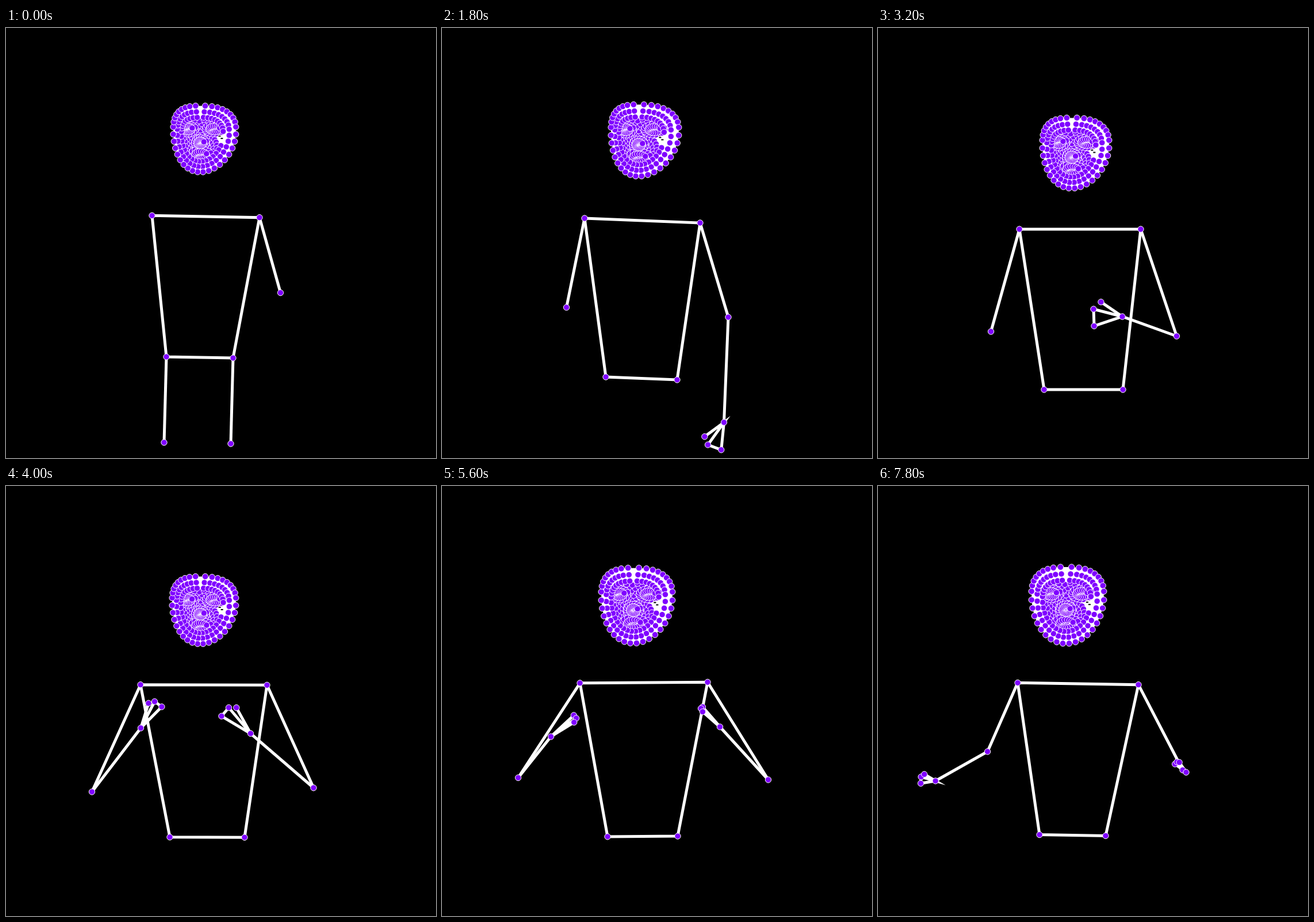
An HTML page with a canvas for the animation above (8 s loop, 748 by 748 pixels).

```html
<!DOCTYPE html>
<html lang="en">
<head>
<meta charset="utf-8">
<title>Pose tracking</title>
<style>
  html, body { margin: 0; width: 100%; height: 100%; overflow: hidden; background: #000; }
  canvas { display: block; width: 100vw; height: 100vh; }
</style>
</head>
<body>
<canvas id="stage" width="748" height="748"></canvas>
<script>
const ctx = document.getElementById('stage').getContext('2d');
const LOOP = 8000, STEP = 200, TAU = Math.PI * 2;
const PURPLE = '#7f00ff', GREEN = '#00ff00', DARK_GREEN = '#4a7a14';

// Key poses in seconds; shorter tracks line up with the last poses.
const times = [0, 1.8, 3.2, 4, 5.6, 6.8, 7.8];
const tilt = [[0.018], [0.04], [0], [0.003], [-0.007], [-0.004], [0.016]];

// Centre x, centre y, half width
const shoulders = [[347.5, 328, 93.5], [348.5, 335, 100.5], [351.5, 350, 105.5], [344, 346, 110], [351, 342, 111], [349, 339.5, 106], [348, 344, 105]];
const hips = [[337, 573, 58], [347, 609.5, 62], [357.5, 629, 68.5], [350, 611, 65], [349, 609.5, 61], [336.5, 595, 58], [338.5, 607.5, 57.5]];

// Centre x, centre y, width, turn of the midline
const face = [[345.5, 193, 109, -7.5], [353, 195.5, 118, -11], [344, 217.5, 116, -7], [344.5, 216, 111, -6.5], [339, 208, 124, -6], [345, 206, 114, -11], [330, 207.5, 126, -3]];

// Hands: offset from wrist to index finger, then spread in degrees
const arms = {
  L: {
    elbow: [[216.5, 486], [196.5, 528], [149.5, 532], [132.5, 507.5], [163, 458], [190.5, 462]],
    wrist: [[234.5, 421], [189.5, 436], [118.5, 475.5], [100, 513]],
    hand: [[24, -46, -17], [44, -32, 7], [-10, -23, 50], [-25, -7, 25]],
    elbowFrom: 1.4, wristFrom: 3.6
  },
  R: {
    elbow: [[477.5, 460.5], [498, 503], [519.5, 536], [535, 525], [567.5, 511], [533.5, 475], [530, 494]],
    wrist: [[490.5, 686], [425, 502], [425.5, 430.5], [483.5, 419], [528.5, 475], [536, 498]],
    hand: [[-28, 39, 30], [-50, -13, 33], [-38, -45, 19], [-33, -32, -5], [-2, -8, 25], [-16, -18, 12]],
    elbowFrom: 0, wristFrom: 1.4
  }
};

const linear = k => k;
const smooth = k => k * k * (3 - 2 * k);

function sample(track, t, ease = linear) {
  const keys = times.slice(-track.length);
  const i = Math.max(0, keys.findLastIndex(key => key <= t));
  if (t <= keys[0] || i === keys.length - 1) return track[i];
  const k = ease((t - keys[i]) / (keys[i + 1] - keys[i]));
  return track[i].map((v, n) => v + (track[i + 1][n] - v) * k);
}

function line(points, color = '#fff') {
  ctx.beginPath();
  points.forEach(p => ctx.lineTo(...p));
  ctx.strokeStyle = color;
  ctx.lineWidth = 5;
  ctx.stroke();
}

function dot([x, y], color = PURPLE) {
  ctx.beginPath();
  ctx.arc(x, y, 5.2, 0, TAU);
  ctx.fillStyle = color;
  ctx.fill();
  ctx.strokeStyle = '#fff';
  ctx.lineWidth = 1;
  ctx.stroke();
}

const add = ([x, y], [dx, dy]) => [x + dx, y + dy];
const polar = (angle, r) => [r * Math.cos(angle), r * Math.sin(angle)];
const power = (v, p) => Math.sign(v) * Math.abs(v) ** p;

// Face points live in a -1..1 box: blunt forehead above, rounder taper to the chin.
function facePoint(angle, scale) {
  const [c, s] = polar(angle, 1);
  const upper = s < 0, p = upper ? 0.77 : 1;
  const v = -0.25 + power(s, p) * (upper ? 0.75 : 1.25);
  return [power(c, p) * scale, 0.05 + (v - 0.05) * scale];
}

const series = (count, make) => Array.from({ length: count }, (_, i) => make(i));
const shell = scale => series(36, i => facePoint((i + 0.5) / 36 * TAU, scale));
const oval = (u, v, w, h) => series(18, i => {
  const [c, s] = polar(i / 18 * TAU, 1);
  return [u + w * c, v + h * s];
});

const rim = shell(1);
const cheek = [0.6, -0.05];
const inside = series(150, i => facePoint(i * 2.4, 0.62 * Math.sqrt(i / 150)));
const features = [1, 0.6].flatMap(k => [
  ...oval(-0.42, -0.3, 0.27 * k, 0.15 * k),
  ...oval(0.42, -0.3, 0.27 * k, 0.15 * k),
  ...oval(0, 0.12, 0.2 * k, 0.16 * k),
  ...oval(0, 0.48, 0.34 * k, 0.17 * k)
]);
const faceDots = [...inside, ...features, ...shell(0.67), ...shell(0.83)]
  .filter(([u, v]) => Math.hypot(u - cheek[0], v - cheek[1]) > 0.14)
  .concat(rim);

function drawFace(t) {
  const [cx, cy, width, turn] = sample(face, t);
  const place = ([u, v]) => [cx + u * width / 2 + (1 - u * u) * turn, cy + v * width * 0.528];
  ctx.beginPath();
  rim.forEach(p => ctx.lineTo(...place(p)));
  ctx.fillStyle = '#fff';
  ctx.fill();
  ctx.fillStyle = '#000';
  for (const side of [-1, 1]) {
    const [x, y] = place(cheek);
    ctx.fillRect(x - 2 + side * 2, y - 1 + side * 2, 4, 2);
  }
  faceDots.forEach(p => dot(place(p)));
}

// Fingers fan out from the palm, thumb longest, joints closing up towards the tips.
function drawTrackedHand(palm) {
  const fingers = series(5, f => {
    const angle = -1.45 - f * 0.463, reach = 30 + 30 * (1 - f / 4) ** 2;
    return series(4, j => add(palm, polar(angle, reach * Math.sqrt((j + 1) / 4))));
  });
  fingers.forEach(finger => line(finger, DARK_GREEN));
  line([palm, ...fingers.map(finger => finger[0]), palm], DARK_GREEN);
  [palm, ...fingers.flat()].forEach(p => dot(p, GREEN));
}

function drawArm(t, shoulder, arm) {
  if (t < arm.elbowFrom) return [];
  const elbow = sample(arm.elbow, t);
  line([shoulder, elbow]);
  if (t < arm.wristFrom) return [elbow];

  const wrist = sample(arm.wrist, t, smooth);
  const [dx, dy, degrees] = sample(arm.hand, t, smooth);
  const angle = Math.atan2(dy, dx), reach = Math.hypot(dx, dy), spread = degrees / 360 * TAU;
  const finger = (turn, scale) => add(wrist, polar(angle + turn * spread, reach * scale));
  const pinky = finger(-1, 1), index = finger(0, 1), thumb = finger(0.6, 0.87);
  line([elbow, wrist, pinky, index, wrist, thumb]);
  return [elbow, wrist, pinky, index, thumb];
}

function draw(t) {
  ctx.fillStyle = '#000';
  ctx.fillRect(0, 0, 748, 748);
  drawFace(t);
  if (t >= 6.4 && t <= 7) drawTrackedHand(add(sample(arms.L.wrist, t, smooth), [-7, 8]));

  const [slope] = sample(tilt, t);
  const ends = track => {
    const [x, y, half] = sample(track, t);
    return [-half, half].map(d => [x + d, y + d * slope]);
  };
  const top = ends(shoulders), base = ends(hips);
  line([top[0], top[1], base[1], base[0], top[0]]);
  const joints = [...top, ...base];
  if (t < 0.5) {
    for (const hip of base) {
      const knee = add(hip, [-4, 149]);
      line([hip, knee]);
      joints.push(knee);
    }
  }
  joints.push(...drawArm(t, top[0], arms.L), ...drawArm(t, top[1], arms.R));
  joints.forEach(p => dot(p));
}

function tick() {
  draw(Math.floor(performance.now() % LOOP / STEP) * STEP / 1000);
  requestAnimationFrame(tick);
}
tick();
</script>
</body>
</html>
```
